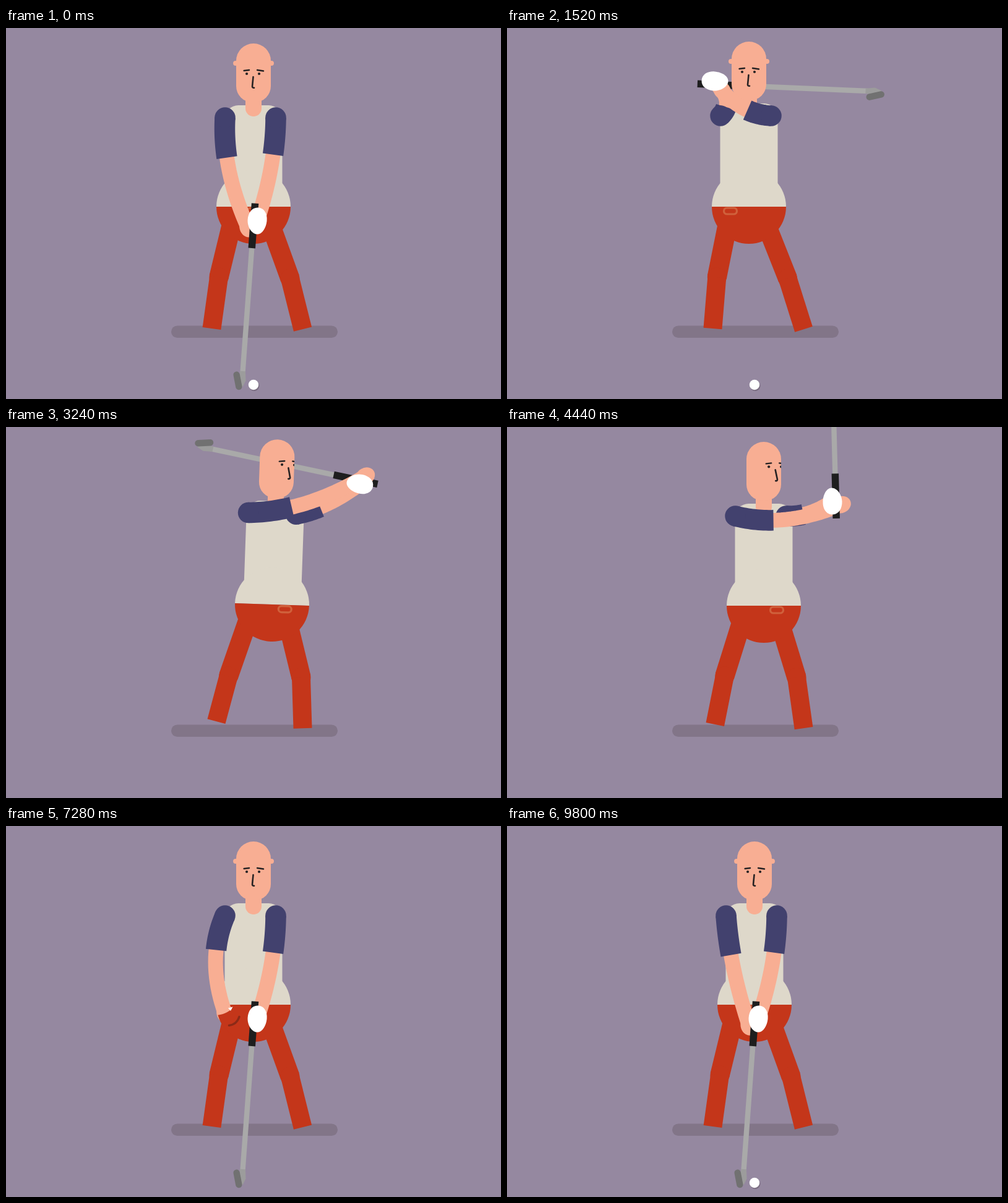
Write an HTML page with a canvas that moves like this. It is 800 by 600 pixels and loops after 10 s.

```html
<!DOCTYPE html>
<html lang="en">
<head>
<meta charset="utf-8">
<title>Golf swing</title>
<style>
  html, body { margin: 0; width: 100%; height: 100%; overflow: hidden; background: #9588a0; }
  canvas { display: block; width: 800px; height: 600px; }
</style>
</head>
<body>
<canvas id="stage" width="800" height="600"></canvas>
<script>
const ctx = document.getElementById('stage').getContext('2d');
const RAD = Math.PI / 180;
const C = {
  bg: '#9588a0', ground: '#827588', skin: '#f8ae93', shirt: '#ded8ca', sleeve: '#42416e',
  pants: '#c4361a', buckle: '#d0613c', seam: '#8c2a17', ink: '#262223',
  grip: '#1e1e1e', shaft: '#a9a9a9', hosel: '#9c9c9c', iron: '#717171', white: '#ffffff'
};

// Address pose: glove x, y; club angle (0 = down, clockwise); hips, torso and arms.
// perp and along place the bare hand relative to the glove.
const ADDRESS = {
  x: 406, y: 312, club: 4.2, shift: 0, drop: 0, lean: 0, rise: 0, turn: 1,
  bendL: 5, bendR: -6, perp: 14, along: 12
};
const TOP = { x: 336, y: 86, club: 272, shift: -9, rise: 3, turn: -30, bendL: 8, bendR: -12 };
const FINISH = {
  x: 572, y: 92, club: -258, shift: 30, drop: -2, lean: 2, rise: 3, turn: 21,
  bendL: 12, bendR: 6, along: -6
};
// Each key lists only what differs from the address
const KEYS = [
  { t: 0, bendL: 10 },
  { t: 640, x: 265, y: 190, club: 125, shift: -4.5, rise: 3, turn: -27, bendL: 0, bendR: -5, perp: 8, along: 18 },
  { t: 1500, ...TOP },
  { t: 1920, ...TOP, club: 277 },
  { t: 2080, x: 294, y: 235, club: 73, shift: 3, drop: 2, lean: -3, rise: 1, turn: -8 },
  { t: 2160, x: 412, y: 313, club: 9, shift: 11, drop: 3, lean: -4, rise: 3, turn: 6 },
  { t: 2240, x: 458, y: 298, club: -14.3, shift: 17, drop: 4, lean: -5, rise: 4, turn: 14, bendL: 0, bendR: -9 },
  { t: 2400, ...FINISH, x: 556, y: 150, club: -150, shift: 23, lean: -1 },
  { t: 3160, ...FINISH },
  { t: 4160, ...FINISH, x: 570 },
  { t: 4440, x: 526, y: 120, club: -181.5, shift: 15, rise: 1, turn: 21, bendL: 13, bendR: 6, along: -6 },
  { t: 4800, x: 450, y: 252, club: -12, shift: 4, turn: 8 },
  { t: 5080, x: 318, y: 228, club: 78, shift: -4, rise: 2, turn: -18, bendL: 0, bendR: -5 },
  { t: 5560, club: -2.7 },
  { t: 5900 }
].map(key => ({ ...ADDRESS, ...key }));

const HIT = 2160, DROP = 7800, LAND = 8080;
const POCKET = [354, 303], RELEASE = [350, 316];

const mix = (a, b, k) => a + (b - a) * k;
const progress = (t, from, to) => Math.min(1, Math.max(0, (t - from) / (to - from)));
const ease = (t, from, to) => {
  const u = progress(t, from, to);
  return u * u * (3 - 2 * u);
};
const bump = (t, from, to) => Math.sin(Math.PI * progress(t, from, to));

// Smooth interpolation between keys that never overshoots them
function poseAt(t) {
  const last = KEYS.length - 1;
  if (t >= KEYS[last].t) return KEYS[last];
  const i = KEYS.findIndex(key => key.t > t) - 1;
  const a = KEYS[i], b = KEYS[i + 1], h = b.t - a.t, u = (t - a.t) / h;
  const slope = (n, p) => (KEYS[n + 1][p] - KEYS[n][p]) / (KEYS[n + 1].t - KEYS[n].t);
  const tangent = (n, p) => {
    if (n === 0 || n === last) return 0;
    const s = slope(n - 1, p), r = slope(n, p);
    return s * r <= 0 ? 0 : 2 * s * r / (s + r);
  };
  const pose = {};
  for (const p in ADDRESS) {
    pose[p] = mix(a[p], b[p], u * u * (3 - 2 * u))
      + h * u * (1 - u) * ((1 - u) * tangent(i, p) - u * tangent(i + 1, p));
  }
  return pose;
}

function turned(x, y, deg, ox, oy) {
  const c = Math.cos(deg * RAD), s = Math.sin(deg * RAD);
  return [ox + x * c - y * s, oy + x * s + y * c];
}

function line(points, width, color, cap = 'butt') {
  ctx.beginPath();
  points.forEach(p => ctx.lineTo(...p));
  ctx.lineWidth = width;
  ctx.strokeStyle = color;
  ctx.lineCap = cap;
  ctx.lineJoin = 'round';
  ctx.stroke();
}

function fill(color, trace) {
  ctx.beginPath();
  trace();
  ctx.fillStyle = color;
  ctx.fill();
}

const disc = (x, y, r, color, from = 0, to = 7) => fill(color, () => ctx.arc(x, y, r, from, to));
const box = (x, y, w, h, r, color) => fill(color, () => ctx.roundRect(x, y, w, h, r));
const polygon = (points, color) => fill(color, () => points.forEach(p => ctx.lineTo(...p)));

function placed(x, y, deg, draw) {
  ctx.save();
  ctx.translate(x, y);
  ctx.rotate(deg * RAD);
  draw();
  ctx.restore();
}

function leg(hip, knee, foot) {
  line([hip, knee], 31.5, C.pants);
  disc(...knee, 15.5, C.pants);
  line([knee, foot], 30, C.pants);
}

// Feet stay planted; knees follow the hips
function legs({ shift, drop, lean }) {
  const x = 400 + shift, y = 300 + drop, dip = Math.max(0, drop), step = Math.max(0, shift);
  leg([x - 31 - 1.4 * lean, y], [344 + 0.52 * shift + 0.3 * dip, 403],
    [332.5 + 0.25 * step, 486 - 0.33 * step + 0.8 * dip]);
  leg([x + 21, y], [459 + 0.6 * shift + 4 * dip, 405], [479.5, 487.2]);
}

const headShape = () => ctx.roundRect(-28, -264, 56, 95, [28, 28, 26, 26]);

function face(look) {
  ctx.save();
  ctx.beginPath();
  headShape();
  ctx.clip();
  ctx.translate(look, -0.45 * look);
  line([[-15.5, -220], [-7, -221]], 2.4, C.ink, 'round');
  line([[6, -221], [16, -219.5]], 2.4, C.ink, 'round');
  disc(-11, -215, 2.1, C.ink);
  disc(9, -215, 2.1, C.ink);
  const k = look / 20, tip = -2 + 5 * k;
  ctx.beginPath();
  ctx.moveTo(-0.5, -210);
  ctx.lineTo(tip, -194.5);
  ctx.quadraticCurveTo(tip, -192, tip + 3 - 6 * k, -192.3);
  ctx.lineWidth = 2.6;
  ctx.stroke();
  ctx.restore();
}

function body({ shift, drop, lean, rise, turn }) {
  const look = Math.max(0, turn) ** 2 / 23;
  placed(400 + shift, 289 + drop, lean, () => {
    box(-46.5, -164 - rise, 93, 128 + rise, [22, 22, 0, 0], C.shirt);
    disc(0, 0, 60, C.shirt, Math.PI, 2 * Math.PI);
    disc(0, 0, 60, C.pants, 0, Math.PI);
    ctx.beginPath();
    ctx.roundRect(turn - 10.5, 2, 21, 10, 5);
    ctx.lineWidth = 3.2;
    ctx.strokeStyle = C.buckle;
    ctx.stroke();
    ctx.translate(0, -rise);
    box(-13, -190, 26, 44, [0, 0, 13, 13], C.skin);
    disc(-29 + look, -232, 4, C.skin);
    disc(29 - look * 0.4, -232, 4, C.skin);
    fill(C.skin, headShape);
    face(look);
  });
}

// A bent limb: one curve in skin, its first part covered by the sleeve
function arm(from, to, bend, bareHand) {
  const dx = to[0] - from[0], dy = to[1] - from[1], len = Math.hypot(dx, dy) || 1;
  const mid = [
    from[0] + dx * 0.45 - dy / len * bend * 2.2,
    from[1] + dy * 0.45 + dx / len * bend * 2.2
  ];
  const curve = u => [0, 1].map(i => mix(mix(from[i], mid[i], u), mix(mid[i], to[i], u), u));
  const part = (a, b) => Array.from({ length: 17 }, (_, i) => curve(mix(a, b, i / 16)));
  line(part(0.2, 1), 24, C.skin);
  if (bareHand) {
    placed(...to, Math.atan2(to[1] - mid[1], to[0] - mid[0]) / RAD, () =>
      fill(C.skin, () => ctx.ellipse(0, 0, 16, 13.5, 0, 0, 7)));
  }
  line(part(0, 0.375), 33.5, C.sleeve);
  disc(...from, 16.75, C.sleeve);
}

function club({ x, y, club: angle }) {
  placed(x, y, angle, () => {
    ctx.translate(-5.5, -28);
    line([[0, 70], [0, 276]], 8.4, C.shaft);
    polygon([[-4.2, 272], [4.2, 272], [6, 287], [2, 297], [-6, 297]], C.hosel);
    placed(-7, 288, -15, () => box(-5.2, -15, 10.4, 30, 5.2, C.iron));
    line([[0, 0], [0, 72.5]], 11.5, C.grip);
  });
}

function glove({ x, y, club: angle }) {
  placed(x, y, angle, () => fill(C.white, () => {
    ctx.moveTo(0, -21.5);
    ctx.bezierCurveTo(11, -21.5, 16, -11, 15.5, -1);
    ctx.bezierCurveTo(15, 11, 9, 21.5, 1, 21.5);
    ctx.bezierCurveTo(-8, 21.5, -15.5, 10, -15.5, -1);
    ctx.bezierCurveTo(-15.5, -12, -10, -21.5, 0, -21.5);
  }));
}

// Pants drawn over the hidden hand
function pocket() {
  ctx.save();
  ctx.beginPath();
  ctx.moveTo(330, 309);
  ctx.lineTo(341, 306);
  ctx.quadraticCurveTo(360, 304, 370, 289.5);
  ctx.lineTo(400, 289.5);
  ctx.lineTo(400, 350);
  ctx.lineTo(330, 350);
  ctx.clip();
  disc(400, 289, 60, C.pants);
  ctx.restore();
  polygon([[359, 294.5], [366.5, 292.5], [363, 299]], C.white);
  ctx.beginPath();
  ctx.moveTo(360.5, 322.5);
  ctx.quadraticCurveTo(373, 321, 377, 308.5);
  ctx.lineWidth = 3.4;
  ctx.lineCap = 'round';
  ctx.strokeStyle = C.seam;
  ctx.stroke();
}

function ball(t) {
  if (t <= HIT || t >= LAND) {
    disc(401.2, 579, 8.2, '#7b6e82');
    disc(400, 577, 8.2, C.white);
  } else if (t < HIT + 240) {
    const s = (t - HIT) / 40;
    const path = u => [400 + 186 * u, 577 - 100 * u - 3.75 * u * u];
    line([path(s * 0.707), path(s)], 16, C.white, 'round');
  } else if (t >= DROP) {
    const k = progress(t, DROP, LAND);
    disc(mix(356, 400, k), mix(334, 577, k * k), 8.2, C.white);
  }
}

function bareHand(t, p) {
  const held = turned(-p.perp, p.along, p.club, p.x, p.y);
  const away = ease(t, 6260, 6880) - ease(t, 7880, 8300);
  const out = ease(t, 7360, DROP);
  return held.map((h, i) => mix(h, mix(POCKET[i], RELEASE[i], out), away)
    - (i ? 14 : 20) * bump(t, 7360, DROP));
}

function draw(t) {
  const p = poseAt(t);
  const spread = 41 - 1.2 * Math.abs(p.lean);
  const shoulder = side =>
    turned(-5 + spread * side, -144 - p.rise, p.lean, 400 + p.shift, 289 + p.drop);
  const elbowOut = 9 * (ease(t, 6260, 6880) - ease(t, 7880, 8300))
    + 6 * bump(t, 6260, 6880) + 20 * bump(t, 7360, DROP);
  const left = () => arm(shoulder(-1), bareHand(t, p), p.bendL + elbowOut, true);
  const right = () => arm(shoulder(1), [p.x, p.y], p.bendR, false);
  const behind = Math.abs(p.club) > 205;

  ctx.fillStyle = C.bg;
  ctx.fillRect(0, 0, 800, 600);
  box(267, 481.5, 269, 19.5, 9.75, C.ground);
  if (behind) club(p);
  legs(p);
  body(p);
  if (p.turn > 5) right();
  left();
  if (t > 6800 && t < 7480) pocket();
  if (p.turn <= 5) right();
  if (!behind) club(p);
  glove(p);
  ball(t);
}

// The picture steps every 40 ms and rests at the end of the loop
const start = performance.now();
function tick(now) {
  const t = Math.max(0, now - start) % 10000;
  draw(Math.min(9800, Math.floor(t / 40) * 40));
  requestAnimationFrame(tick);
}
draw(0);
requestAnimationFrame(tick);
</script>
</body>
</html>
```
